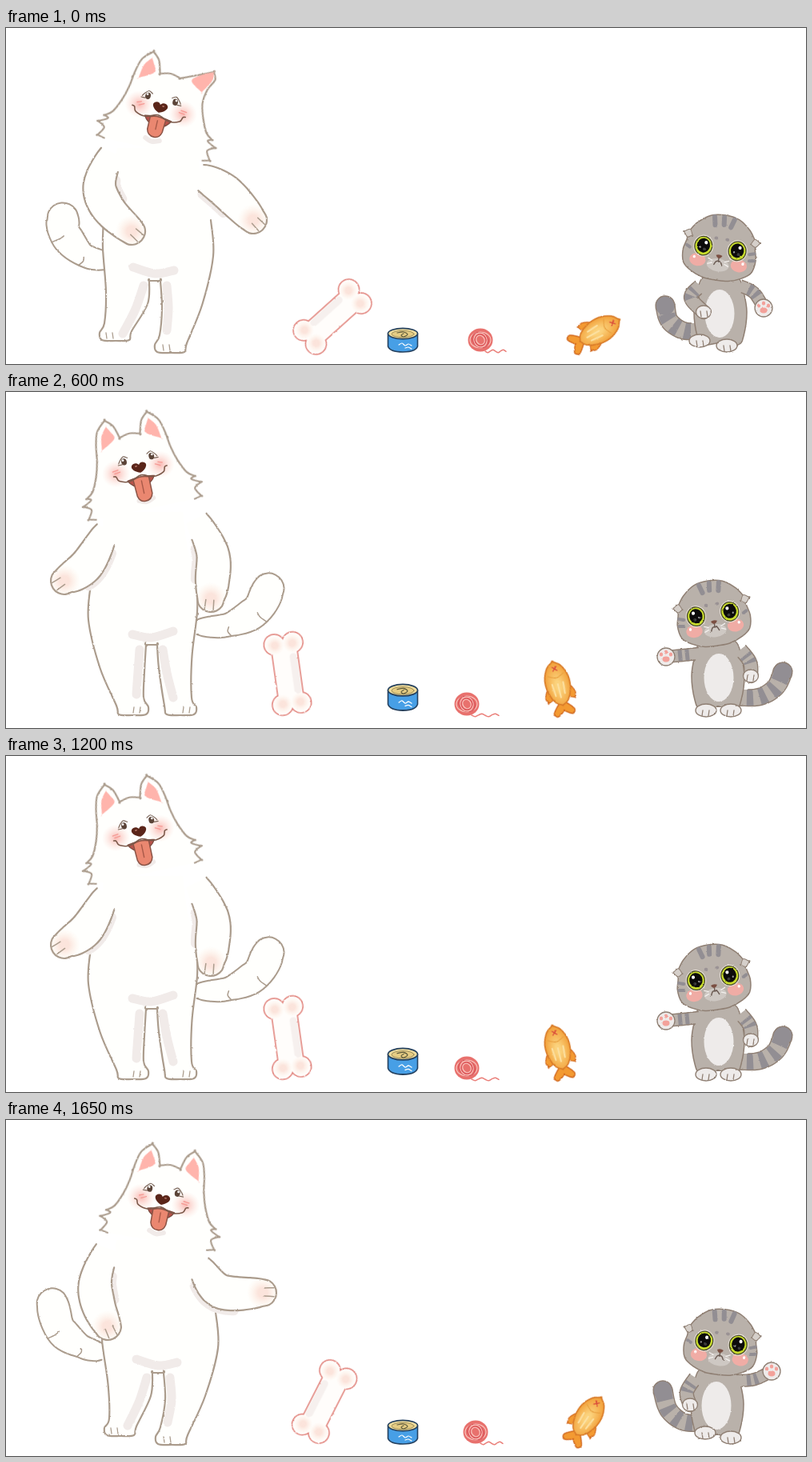
These frames come from a looping animation (1000x420 px, 1800 ms). An HTML page:

```html
<!DOCTYPE html>
<html lang="en">
<head>
<meta charset="utf-8">
<title>Dancing pets</title>
<style>
html, body { margin: 0; width: 100%; height: 100%; overflow: hidden; background: #fff; }
svg { display: block; width: 100vw; height: 100vh; }
svg * { stroke-linecap: round; stroke-linejoin: round; }
</style>
</head>
<body>
<svg viewBox="0 0 1000 420">
  <defs>
    <filter id="pencil" x="-20%" y="-20%" width="140%" height="140%" color-interpolation-filters="sRGB">
      <feTurbulence type="fractalNoise" baseFrequency=".25" numOctaves="2" seed="4"/>
      <feDisplacementMap in="SourceGraphic" scale="2" xChannelSelector="R" yChannelSelector="G"/>
    </filter>
    <radialGradient id="blush"><stop offset=".1" stop-color="#f9b3ac" stop-opacity=".8"/><stop offset="1" stop-color="#fbd9d0" stop-opacity="0"/></radialGradient>
    <radialGradient id="paw"><stop offset=".3" stop-color="#fbe1d8" stop-opacity=".9"/><stop offset="1" stop-color="#fdf0e4" stop-opacity="0"/></radialGradient>
    <radialGradient id="gold" cx=".5" cy=".55"><stop offset=".2" stop-color="#fbd27c"/><stop offset="1" stop-color="#f2a23c"/></radialGradient>
  </defs>
  <g id="stage"></g>
</svg>
<script>
const STEP = 150;
const FUR = '#fffffd', LINE = '#ab9c8d', SHADE = '#f1ebe9';
const GREY = '#b9b1aa', STRIPE = '#928e93', EDGE = '#8f7f73', PALE = '#eeebea';
const mix = (a, b, t) => a + (b - a) * t;

// "x,y" pairs; "!" marks a sharp corner.
const parse = text => text.split(' ').flatMap(s => {
  const p = s.split(',').map(parseFloat);
  return s.endsWith('!') ? [p, p] : [p];
});
// Half an outline, from the middle to the right, completed to the left.
function mirror(text) {
  const half = parse(text);
  return [...half.slice(1).reverse().map(([x, y]) => [-x, y]), ...half];
}
// Smooth curve through points.
function curve(src, closed) {
  const pts = typeof src === 'string' ? parse(src) : src, n = pts.length;
  const at = i => closed ? pts[(i + n) % n] : pts[Math.max(0, Math.min(n - 1, i))];
  let d = 'M' + pts[0];
  for (let i = 0; i < (closed ? n : n - 1); i++) {
    const [a, b, c, e] = [at(i - 1), at(i), at(i + 1), at(i + 2)];
    const ctrl = (p, q, r, k) => [0, 1].map(j => (p[j] + k * (r[j] - q[j]) / 6).toFixed(1));
    d += `C${ctrl(b, a, c, 1)} ${ctrl(c, b, e, -1)} ${c}`;
  }
  return d + (closed ? 'Z' : '');
}
// Point on the smooth curve at t from 0 to 1.
function spot(pts, t) {
  const s = t * (pts.length - 1), i = Math.min(Math.floor(s), pts.length - 2), u = s - i;
  const [a, b, c, e] = [i - 1, i, i + 1, i + 2].map(k => pts[Math.max(0, Math.min(pts.length - 1, k))]);
  return [0, 1].map(j => b[j] + u * ((c[j] - a[j]) / 2 + u * (a[j] - 2.5 * b[j] + 2 * c[j] - e[j] / 2 +
    u * (1.5 * (b[j] - c[j]) + (e[j] - a[j]) / 2))));
}
// Limb of radius r(t) round a spine, open at its root; side tells where the inner edge lies.
function tube(text, r, side) {
  const spine = parse(text), near = [], far = [], cap = [], n = 12;
  let end, dir;
  const move = ([x, y], [u, v], along, across) => [x + u * along - v * across, y + v * along + u * across];
  for (let i = 0; i <= n; i++) {
    const t = i / n, a = spot(spine, Math.max(0, t - .02)), b = spot(spine, Math.min(1, t + .02));
    const h = Math.hypot(b[0] - a[0], b[1] - a[1]);
    dir = [(b[0] - a[0]) / h, (b[1] - a[1]) / h];
    end = spot(spine, t);
    near.push(move(end, dir, 0, side * r(t)));
    far.unshift(move(end, dir, 0, -side * r(t)));
  }
  for (let a = Math.PI / 6; a < 3; a += Math.PI / 6)
    cap.push(move(end, dir, r(1) * Math.sin(a), side * r(1) * Math.cos(a)));
  return { near, far, end, edge: [...near, ...cap, ...far], tip: (along, across) => move(end, dir, along, across) };
}

const path = (d, fill, stroke = 'none', w = 0, more = '') =>
  `<path d="${d}" fill="${fill}" stroke="${stroke}" stroke-width="${w}" ${more}/>`;
const shape = (pts, fill, stroke, w) => path(curve(pts, true), fill, stroke, w);
const line = (pts, stroke, w, more) => path(curve(pts), 'none', stroke, w, more);
const lines = (text, stroke, w) => text.split('|').map(s => line(s, stroke, w)).join('');
const oval = (x, y, rx, ry, fill, stroke = 'none', w = 0) =>
  `<ellipse cx="${x}" cy="${y}" rx="${rx}" ry="${ry}" fill="${fill}" stroke="${stroke}" stroke-width="${w}"/>`;
const pair = (x, y, rx, ry, ...paint) => oval(-x, y, rx, ry, ...paint) + oval(x, y, rx, ry, ...paint);
const group = (transform, inner) => `<g transform="${transform}">${inner}</g>`;
const pencil = inner => `<g filter="url(#pencil)">${inner}</g>`;
const toes = (x, y, color) => [-4, 4].map(k => line([[x + k, y - 8], [x + k + 1, y - 1]], color, 1.3)).join('');

// hips: left, right, crotch; feet: x, y of each; arms: left and right spine; head: nose x, y, turn
const DOGS = [
  { head: [192, 100, 13], ear: 25, tongue: 37, hips: [121, 259, 186], feet: [137, 391, 206, 406],
    arms: ['132,155 117,195 128,226 157,254', '240,183 274,204 309,240'], tail: '130,292 98,284 74,258 71,238' },
  { head: [195, 100, 10], ear: 0, tongue: 38, hips: [120, 265, 190], feet: [143, 395, 207, 406],
    arms: ['126,160 112,200 115,230 127,258', '242,181 268,214 321,216'], tail: '122,291 95,283 68,262 58,230' },
  { head: [199, 95, 12], ear: 0, tongue: 42, hips: [127, 263, 184], feet: [148, 404, 208, 404],
    arms: ['128,158 108,200 108,235 110,258', '240,172 265,216 293,236'], tail: '128,294 88,291 53,273 38,246' },
  { head: [173, 96, 0], ear: 0, tongue: 29, hips: [111, 244, 176], feet: [148, 406, 205, 406],
    arms: ['123,182 103,222 90,259', '242,167 264,202 260,232 246,254'], tail: '245,285 265,278 281,252' }
];

const dogArm = t => 14 + 6 * Math.sin(Math.PI * t) + 3 * t;
const dogTail = t => 9 + 10 * Math.min(1, 1.6 * t) + 1.5 * Math.abs(Math.sin(9 * t));
const foot = (x, y) => parse('-14,-22 -20,-10 -17,-1 0,0 17,-1 20,-12').map(([a, b]) => [x + a, y + b]);

function dogBody([l, r, c], [ax, ay, bx, by]) {
  const pts = [[l + 18, 150], [l + 12, 195], [l + 1, 240], [l, 275], [mix(l, ax - 8, .5), 330], ...foot(ax, ay),
    [c - 9, 345], ...parse(`${c - 7},316! ${c + 7},316!`), [c + 9, 350], ...foot(bx, by),
    [mix(bx + 26, r, .5), 345], [r, 285], [r - 3, 240], [r - 13, 200], [r - 20, 150]];
  return path(curve(pts), FUR) +
    line([[c - 27, 299], [c, 307], [c + 24, 303]], SHADE, 11) +
    line([[c - 14, 322], [mix(c - 14, ax + 9, .4), 352], [ax + 9, 382]], SHADE, 11) +
    line([[c + 15, 322], [c + 17, 350], [bx - 5, 378]], SHADE, 11) +
    line(pts.slice(2, -2), LINE, 2.2) + toes(ax - 8, ay - 2, LINE) + toes(bx - 6, by - 2, LINE);
}

function dogLimb(spine, side) {
  const { near, edge, end, tip } = tube(spine, dogArm, side);
  return line(near.slice(3, -4), SHADE, 12) + path(curve(edge), FUR) + oval(...end, 20, 20, 'url(#paw)') +
    line(edge.slice(2), LINE, 2.2) +
    [-6, 4].map(k => line([tip(2, k), tip(14, k * 1.1)], LINE, 1.5)).join('');
}

function dogTailArt(spine) {
  const pts = parse(spine);
  const { edge, far } = tube(spine, dogTail, pts[0][0] > pts[pts.length - 1][0] ? 1 : -1);
  const near = [...edge].slice(0, 13);
  const curls = [4, 8].map(i => {
    const a = far[i], b = near[12 - i];
    return line([a, [mix(a[0], b[0], .2) + 3, mix(a[1], b[1], .2)], [mix(a[0], b[0], .45), mix(a[1], b[1], .4)]], LINE, 1.5);
  });
  return path(curve(edge), FUR, LINE, 2) + curls.join('');
}

function dogHead([x, y, turn], lean, len) {
  const skull = mirror('0,-45 13,-42! 18,-58 27,-67! 39,-55 44,-38 47,-18 52,0 60,17 69,24! 64,27 75,33! 66,39 72,50! 63,52');
  // Only the right ear tips outwards.
  const outline = skull.map(([a, b]) => a > 15 && b < -30 ? [a + lean * (-b - 30) / 37, b + lean * (-b - 30) / 120] : [a, b]);
  const ear = (s, k) => shape([[s * 20 + k * .3, -42], [s * 23 + k * .6, -52], [s * 27 + k, -59], [s * 27 + k, -59], [s * 35 + k * .7, -48], [s * 38 + k * .2, -31], [s * 38 + k * .2, -31]], '#ffb4ac');
  const eye = s => group(`translate(${s * 17.5} -12.5) scale(${s} 1)`,
    oval(0, 1, 3.4, 4.2, '#5b4438') + oval(1, -1, 1.4, 1.4, '#fff') + lines('-5,-3 0,-5.5 5,-1 7,2|3,4 8,4', '#7a6558', 1.2));
  return group(`translate(${x} ${y}) rotate(${turn})`,
    group(`translate(${turn * .3} 0)`, pencil(path(curve(outline), FUR, LINE, 2.2) + ear(-1, 0) + ear(1, lean))) +
    lines('-9,40 0,43 9,40', SHADE, 6) +
    group('translate(2 0)', pair(28, 1, 18, 17, 'url(#blush)') +
      lines('-31,-1 -26,-3|-28,2 -22,-1|25,-3 32,-2|23,0 30,1', '#f59b95', 1.3)) +
    eye(-1) + eye(1) +
    path('M-16 13Q0 9 18 13Q13 23 1 24Q-11 22-16 13Z', '#b8524a', '#7c4c3f', 1.3) +
    path(`M-9 13Q1 9 11 13L10 ${len - 8}Q8 ${len} 1 ${len}Q-7 ${len}-9 ${len - 8}Z`, '#ea8770', '#8a5345', 1.5) +
    lines(`1,16 1,${len - 10}`, '#a95a49', 1.4) + line(mirror('0,9 15,14 28,11 31,5 34,4'), '#7c5a4b', 1.6) +
    path('M0 6C-6 4-11-2-8-5C-5-8-1-7 0-4C2-7 6-8 9-5C12-1 6 4 0 6Z', '#5a2519') + oval(4, -3, 1.6, 1, '#a86b5c'));
}

const dog = p => pencil(dogTailArt(p.tail) + dogBody(p.hips, p.feet) + dogLimb(p.arms[0], -1) + dogLimb(p.arms[1], 1)) +
  dogHead(p.head, p.ear, p.tongue);

// hang and wave: spine of each arm, from shoulder to paw
const CATS = [
  { x: 893, head: [891.4, 285.4, 9], feet: [867, 391, 901, 397], tail: '866,379 846,378 829,366 824,347',
    hang: '868,322 856,337 872,355', wave: '917,322 935,331 947,350' },
  { x: 889, head: [892.8, 288.4, 7], feet: [874, 391, 906, 397], tail: '868,379 846,377 828,362 821,338',
    hang: '862,322 851,340 855,356', wave: '914,326 936,324 957,314' },
  { x: 888, head: [892.9, 287.4, 8.5], feet: [872, 398, 903, 398], tail: '862,382 836,381 816,369 807,350',
    hang: '860,322 848,338 847,355', wave: '912,327 932,329 953,331' },
  { x: 885, head: [882, 288, 0], feet: [868, 398, 901, 398], tail: '912,383 936,384 955,372 965,360',
    hang: '910,322 922,338 920,360', wave: '862,322 849,337 837,356' }
];

function catLimb(spine, r, side, dash, tip) {
  const { edge, end } = tube(spine, r, side);
  return path(curve(edge), GREY) +
    line(spine, STRIPE, 2 * r(.5) - 1, `stroke-dasharray="${dash}" style="stroke-linecap:butt"`) +
    (tip ? oval(...end, r(1), r(1), tip) : '') + line(edge.slice(2), EDGE, 1.4);
}

function catHead(x, y, turn) {
  const eye = oval(0, 0, 13.6, 13.6, '#e6dfd6') + oval(0, 0, 11.8, 11.8, '#c9dd2c', '#4a4a2a', 1.3) +
    oval(0, -.5, 8.8, 9, '#0c0b0b') + oval(3, -4.5, 2.2, 2.2, '#fff') + oval(-4, 2, 1.2, 1.2, '#999') + oval(2, 4, 2.2, 1.8, '#3c3c3c');
  const ear = s => group(`scale(${s} 1)`, shape('48,-24! 41,-28 37,-21! 43,-18', '#d5cfca', EDGE, 1));
  return group(`translate(${x} ${y}) rotate(${turn})`,
    shape(mirror('0,-52 18,-49 33,-38 41,-27! 48,-24! 43,-17 46,-2 43,14 32,23 16,29 0,30'), GREY, EDGE, 1.5) +
    lines('-13,-48 -11,-38|-1,-49 0,-40|12,-48 9,-38', STRIPE, 6) + lines('37,-8 43,-10|38,0 44,-1|-38,-6 -42,-8', STRIPE, 4) +
    ear(-1) + ear(1) + pair(7, -22, 2.5, 2, '#9a9294') + oval(0, 11, 14, 8, '#cec8c3') +
    group(`scale(${turn ? .93 : 1} 1)`, pair(28, 8, 11, 8, '#f0aca5') + pair(33, 5, 1.8, 1.8, '#fff') +
      group('translate(-23 -10)', eye) + group('translate(23 -10)', eye)) +
    path('M-4-1Q0-3 4-1Q3 2 0 3Q-3 2-4-1Z', '#7b4f42') +
    lines('0,3 0,7|-5,11 -3,7 0,6 3,7 5,11', '#6a5a52', 1.4) +
    lines('-8,6 -13,4|-8,9 -13,11|8,6 13,4|8,9 13,11', '#f3f0ee', 1.3));
}

function cat(p) {
  const paw = (x, y) => oval(x, y, 13, 8, PALE, EDGE, 1.4) + toes(x, y + 8, EDGE);
  const [hx, hy] = parse(p.hang).pop(), [wx, wy] = parse(p.wave).pop();
  const side = wx > p.x ? 1 : -1, [a, b, c, d] = p.feet;
  const pads = [-1, 0, 1].map(k => oval(wx + 6 * k, wy - 6 + 3 * k * k, 2.2, 2.6, '#f3a19a')).join('');
  return pencil(catLimb(p.tail, t => 10 + 2 * t, 1, '0 10 8 8 8 8 8 8 60', STRIPE) +
    group(`translate(${p.x} 0)`, shape(mirror('0,310 22,312 29,330 33,355 29,385 22,396 0,393'), GREY, EDGE, 1.5) +
      oval(-1, 357, 18.5, 30, PALE)) + paw(a, b) + paw(c, d) +
    catLimb(p.hang, () => 8.5, -side, '0 9 4 4 4 90') + oval(hx, hy, 9.5, 8, PALE, EDGE, 1.3) + toes(hx, hy + 7, EDGE) +
    catLimb(p.wave, () => 7.5, side, '0 12 5 4 5 90') + oval(wx, wy, 11, 11, PALE, EDGE, 1.3) +
    oval(wx, wy + 3, 4.5, 3.4, '#f3a19a') + pads + catHead(...p.head));
}

// Four lobes and a shaft: the wider copy below shows as the outline.
const lobes = (grow, fill) => [-1, 1].map(s => group(`translate(0 ${38 * s})`, pair(11.5, 0, 13 + grow, 13 + grow, fill))).join('') +
  `<rect x="${-16 - grow}" y="-36" width="${32 + 2 * grow}" height="72" fill="${fill}"/>`;
const bone = pencil(lobes(.8, '#e07f78') + lobes(-.7, '#fffdfb') + lines('-10,-20 -10,22', '#f6f0ee', 9) +
  [-37, 37].map(y => pair(11, y, 12, 12, 'url(#paw)')).join(''));

const can = path('M-18.5-8V8Q-16 15 0 15Q16 15 18.5 8V-8Z', '#479fe6', '#25415f', 1.6) +
  oval(0, -8, 18.5, 6.6, '#efdc9c', '#25415f', 1.6) + oval(0, -7.5, 14, 4.2, '#e6cd84', '#8e8050', .8) +
  lines('-7,-9 1,-10 6,-7 1,-4 -2,-6 1,-8', '#5d5a3c', 1.2) +
  lines('-5,6 -1,4 3,7 7,5 11,7|3,10 7,9 11,11', '#fff', 1.2);

function yarn(len) {
  const loops = [0, 1, 2, 3, 4].map(k => group(`rotate(${k * 37})`, oval(0, 0, 13 - 2 * k, 10 - k, 'none', k % 2 ? '#d9555a' : '#f9c4bd', 1.2)));
  const tail = Array.from({ length: 9 }, (_, i) => [mix(6, len, i / 8), 14 + 1.8 * Math.sin(i * 1.6)]);
  return oval(0, 0, 15.5, 14.5, '#e8716d') + loops.join('') + line(tail, '#ea7f79', 1.5);
}

const fin = s => group(`scale(${s} 1)`, shape('14,0 19,9 17,16! 10,12', '#f39a32', '#d2691f', 1.3));
const fish = pencil(shape(mirror('0,16 6,21 13,30 9,35 0,29'), '#f39a32', '#d2691f', 1.5) + fin(-1) + fin(1) +
  shape(mirror('0,-34! 9,-27 15,-12 14,4 8,17 0,22'), 'url(#gold)', '#d97b28', 1.7) +
  lines('-10,-17 0,-13 10,-17', '#e8a040', 1.2) + lines('-7,-6 -6,8|0,-5 0,12|7,-6 6,8', '#fce0a0', 2.2) +
  lines('-3,-27 2,-22|2,-27 -3,-22', '#d8473a', 1.4));

// Sum of the x of a point and of its mirror image.
const AXIS = { dog: 366, cat: 1778, bone: 743, fish: 1405 };
const BONES = [[408, 361, 48], [398, 352, 27], [391, 352, 8], [366.5, 345, 0]];
const FISHES = [[737, 381, 61], [725, 375, 34], [714, 370, 14], [704.5, 370, 0]];
const CANS = [[390, 1, 1], [390, 1, 1], [381.5, 1, 1.1], [375, 1.2, 1.13]];
const YARNS = [[593, 32], [587, 34], [576, 40], [569, 44]];

const scene = Array.from({ length: 7 }, (_, k) => {
  const i = k > 3 ? 6 - k : k;
  const flip = (sum, inner) => group(k > 3 ? `translate(${sum} 0) scale(-1 1)` : '', inner);
  const place = ([x, y, a], inner) => group(`translate(${x} ${y}) rotate(${a})`, inner);
  const [cy, sx, sy] = CANS[i], [yx, len] = YARNS[i];
  return '<g display="none">' + flip(AXIS.dog, dog(DOGS[i])) + flip(AXIS.bone, place(BONES[i], bone)) +
    group(`translate(496 ${cy}) scale(${sx} ${sy})`, can) + group(`translate(${yx} 390)`, yarn(len)) +
    flip(AXIS.fish, place(FISHES[i], fish)) + flip(AXIS.cat, cat(CATS[i])) + '</g>';
});
const stage = document.getElementById('stage');
stage.innerHTML = scene.join('');

const poses = [...stage.children];
const start = performance.now();
let shown = null;
function draw(now) {
  const n = Math.floor(Math.max(0, now - start) / STEP) % 12;
  const next = poses[n > 6 ? 12 - n : n];
  if (next !== shown) {
    if (shown) shown.setAttribute('display', 'none');
    next.removeAttribute('display');
    shown = next;
  }
  requestAnimationFrame(draw);
}
draw(start);
</script>
</body>
</html>
```
